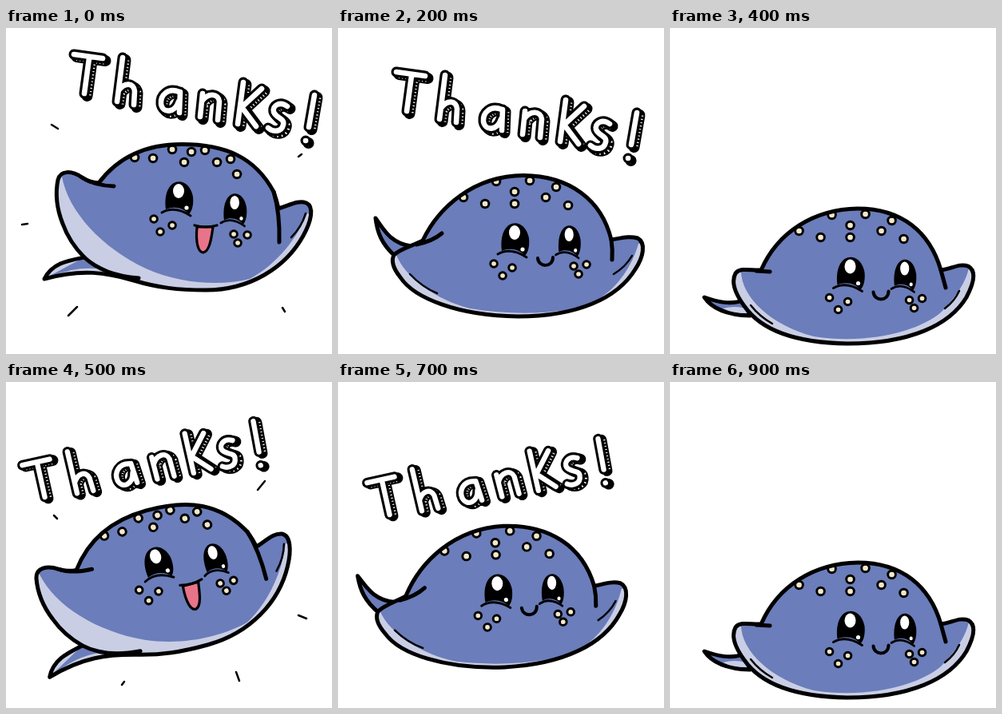
An HTML page without scripts for the animation above (1000 ms loop, 408 by 408 pixels).

```html
<!DOCTYPE html>
<html lang="en">
<head>
<meta charset="utf-8">
<title>Thanks!</title>
<style>
  html, body { margin: 0; width: 100%; height: 100%; overflow: hidden; background: #fff; }
  svg { display: block; width: 100vw; height: 100vh; fill: none; stroke-linecap: round; stroke-linejoin: round; }
  .line { stroke: #000; stroke-width: 5; }
  .thin { stroke-width: 2.5; }
  .blue { fill: #6b7dba; }
  .pale { fill: #c9cee4; }
  .pink { fill: #e8748a; stroke-width: 3.2; }
  .rim { stroke: #000; stroke-width: 12.5; }
  .cream { stroke: #f3e8cb; stroke-width: 6.6; }
  .small .rim { stroke-width: 11.5; }
  .small .cream { stroke-width: 5.6; }
  .shade { stroke: #000; stroke-width: 14; }
  .hatch { stroke: #fff; stroke-width: 10; stroke-dasharray: 1.2 3; stroke-linecap: butt; }
  .edge { stroke: #000; stroke-width: 13; }
  .fill { stroke: #fff; stroke-width: 6.6; }
  .pose { visibility: hidden; animation: show 1s step-end infinite; animation-delay: calc(var(--i) * 100ms - 1000ms); }
  @keyframes show {
    0% { visibility: visible; }
    10%, 100% { visibility: hidden; }
  }
</style>
</head>
<body>
<svg viewBox="0 0 408 408" role="img" aria-label="A happy manta ray saying Thanks!">
  <defs>
    <!-- lettering -->
    <path id="letters" d="M85 33L121 38M104 38L98 82
      M146 37L139 92M141 78C149 67 160 69 161 79L160 96
      M217 80C203 74 193 84 194 95C196 107 211 107 216 92M218 80L217 106
      M246 82L243 111M245 92C253 80 266 82 267 92L265 115
      M297 68L290 120M320 76L295 99L313 123
      M352 98C343 91 333 97 335 105C338 113 349 113 347 121C345 130 335 131 328 125
      M386 84L379 124M375 141h.1"/>
    <g id="thanks">
      <g transform="translate(3.5 3)">
        <use href="#letters" class="shade"/>
        <use href="#letters" class="hatch"/>
      </g>
      <use href="#letters" class="edge"/>
      <use href="#letters" class="fill"/>
    </g>
    <g id="tilted"><use href="#thanks" transform="translate(49 148) rotate(-20.4) scale(.964) translate(-97 -86)"/></g>

    <!-- faces -->
    <g id="eye">
      <path fill="#000" d="M-17 14C-22 -28 12 -30 17 -2C18 8 16 16 12 20C6 13 -6 9 -17 14Z"/>
      <path class="line" style="stroke-width:3" d="M-22 18Q-6 9 14 22"/>
      <ellipse cx="-1" cy="-9" rx="7" ry="9" fill="#fff"/>
      <circle cx="9" cy="12" r="2.6" fill="#fff"/>
    </g>
    <path id="joyDots" d="M161 162h.1M184 163h.1M208 152h.1M223 168h.1M232 155h.1M249 153h.1M264 168h.1M281 164h.1M289 183h.1"/>
    <path id="joyCheeks" d="M185 239h.1M208 247h.1M193 255h.1M285 258h.1M302 259h.1M290 269h.1"/>
    <path id="calmDots" d="M157 212h.1M184 220h.1M198 192h.1M221 205h.1M221 220h.1M240 191h.1M260 212h.1M273 199h.1M288 222h.1"/>
    <path id="calmCheeks" d="M195 295h.1M218 300h.1M206 310h.1M295 298h.1M311 296h.1M301 308h.1"/>
    <g id="joySpots"><use href="#joyDots" class="rim"/><use href="#joyDots" class="cream"/></g>
    <g id="calmSpots"><use href="#calmDots" class="rim"/><use href="#calmDots" class="cream"/></g>
    <g id="joy">
      <use href="#eye" transform="translate(217 213)"/>
      <use href="#eye" transform="translate(287 227) scale(.83 .95)"/>
      <g class="small"><use href="#joyCheeks" class="rim"/><use href="#joyCheeks" class="cream"/></g>
      <path class="line pink" d="M239 249C237 270 241 281 247 281C255 279 257 263 259 249Z"/>
      <path class="line" style="stroke-width:3.2" d="M236 247Q250 251 264 247"/>
    </g>
    <g id="calm">
      <use href="#eye" transform="translate(222 265)"/>
      <use href="#eye" transform="translate(290 267) scale(.8 .95)"/>
      <g class="small"><use href="#calmCheeks" class="rim"/><use href="#calmCheeks" class="cream"/></g>
      <path class="line" style="stroke-width:4" d="M250 288C251 300 269 300 269 287"/>
    </g>

    <!-- bodies -->
    <path id="highShape" d="M116 194C140 162 175 145.500 220 145.500C275 145.500 312 162 335 205Q339 216 341 226C355 222 365 215 376 219C386 224 382 242 372 260C350 300 305 328 250 328C215 328 190 325 160 316C125 306 95 301 48 314C58 294 78 291 98 287C84 273 76 259 71 245C63 225 62 205 65 190C68 178 82 178 95 187Q104 193 116 194Z"/>
    <path id="glideShape" d="M108 214C130 178 170 155 215 155C270 154 310 178 328 215Q333 228 335 241C350 237 360 229 371 233C382 238 380 258 370 275C345 312 290 337 220 337C160 336 110 325 64 303C55 297 47 291 43 282C62 294 80 297 99 296C75 280 62 262 56 240C52 220 58 208 72 210C85 212 95 218 108 214Z"/>
    <path id="dipShape" d="M106 266C126 224 170 185 232 184.500C290 185 330 215 342 265C355 263 364 260 375 263C386 269 382 287 372 302C350 338 300 361 225 361C150 360 95 338 78 312C70 302 66 292 70 284C78 276 95 272 106 266Z"/>
    <path id="lowShape" d="M114 303C135 255 180 227 235 226C290 226 325 255 339 303C352 302 362 294 373 298C384 304 380 320 371 337C350 372 300 395 222 395C160 394 115 380 93 348C82 333 76 318 82 307C88 299 102 304 114 303Z"/>
    <clipPath id="highClip"><use href="#highShape"/></clipPath>
    <clipPath id="glideClip"><use href="#glideShape"/></clipPath>
    <clipPath id="dipClip"><use href="#dipShape"/></clipPath>
    <clipPath id="lowClip"><use href="#lowShape"/></clipPath>

    <g id="high">
      <use href="#highShape" class="blue"/>
      <g clip-path="url(#highClip)">
        <path class="pale" d="M70 186C78 230 120 275 175 301C220 321 270 323 305 314C340 295 365 262 377 232L400 240V400H40V186Z"/>
        <path class="blue" d="M40 318L98 287L128 303Q92 296 60 310Z"/>
        <use href="#joySpots"/>
      </g>
      <use href="#highShape" class="line"/>
      <path class="line" d="M95 187Q110 197 135 198M335 205Q343 232 342 268M98 287C115 303 140 311 166 313"/>
      <path class="line thin" d="M375 232Q370 249 357 262"/>
      <use href="#joy"/>
    </g>

    <g id="glide">
      <use href="#glideShape" class="blue"/>
      <g clip-path="url(#glideClip)">
        <path class="pale" d="M61 218C75 255 110 287 150 304C200 325 265 329 315 317C350 295 368 270 376 243L400 250V400H30V218Z"/>
        <path class="blue" d="M38 276L99 296L132 318Q85 312 52 292Z"/>
        <use href="#joySpots" transform="translate(-4 11) rotate(-2 235 200)"/>
      </g>
      <use href="#glideShape" class="line"/>
      <path class="line" d="M90 216Q105 220 124 216M328 215Q339 245 338 277M99 296C118 313 145 323 175 323"/>
      <path class="line thin" d="M75 232Q82 250 95 262M374 246Q370 262 358 275"/>
      <use href="#joy" transform="translate(-4 11) rotate(-2.5 235 200)"/>
    </g>

    <g id="dip">
      <path class="line blue" d="M72 286C54 270 49 255 47 238C57 252 66 270 92 273Z"/>
      <use href="#dipShape" class="blue"/>
      <g clip-path="url(#dipClip)">
        <path class="pale" d="M73 284C84 312 122 340 165 351C225 361 295 358 325 340C350 325 368 298 376 270L400 270V400H40V284Z"/>
        <use href="#calmSpots"/>
      </g>
      <use href="#dipShape" class="line"/>
      <path class="line" d="M98 271Q118 267 130 257M342 265Q344 277 343 290"/>
      <path class="line thin" d="M90 308Q105 324 124 332M368 285Q360 299 345 308"/>
      <use href="#calm"/>
    </g>

    <g id="low">
      <path class="line blue" d="M100 360C72 359 53 352 43 337C60 343 76 347 94 340Z"/>
      <path class="pale" d="M66 351Q82 347 94 351L96 357Q78 357 66 351Z"/>
      <use href="#lowShape" class="blue"/>
      <g clip-path="url(#lowClip)">
        <path class="pale" d="M89 303C88 335 125 372 180 386C250 397 315 378 340 355C362 332 371 315 374 300H400V400H40V303Z"/>
        <use href="#calmSpots" transform="translate(4.5 42)"/>
      </g>
      <use href="#lowShape" class="line"/>
      <path class="line" d="M108 304L125 305M339 303L345 325"/>
      <path class="line thin" d="M101 347Q112 361 128 370M362 329Q356 342 344 351"/>
      <use href="#calm" transform="translate(4.5 42.5)"/>
    </g>
  </defs>

  <g class="pose" style="--i:0">
    <use href="#thanks"/>
    <use href="#high"/>
    <path class="line thin" d="M57 121L65 126M366 161L370 158M20 246L27 245M78 360L89 349M346 350L349 355"/>
  </g>
  <g class="pose" style="--i:1">
    <use href="#thanks" x="-6" y="13"/>
    <use href="#glide"/>
  </g>
  <g class="pose" style="--i:2">
    <use href="#thanks" x="-12" y="22"/>
    <use href="#dip"/>
  </g>
  <g class="pose" style="--i:3">
    <use href="#thanks" x="-18" y="32"/>
    <use href="#dip" x="4" y="21"/>
  </g>
  <g class="pose" style="--i:4">
    <use href="#low"/>
  </g>
  <g class="pose" style="--i:5">
    <use href="#tilted"/>
    <use href="#high" transform="translate(-75.5 79.5) rotate(-15.5)"/>
    <path class="line thin" d="M60 167L64 171M315 135L324 124M366 292L376 296M288 363L292 374M145 379L148 375"/>
  </g>
  <g class="pose" style="--i:6">
    <use href="#tilted" x="8" y="11"/>
    <use href="#glide" transform="translate(-21 2) rotate(-8 247 230)"/>
  </g>
  <g class="pose" style="--i:7">
    <use href="#tilted" x="16" y="22"/>
    <use href="#dip" transform="translate(-21 -3.5) rotate(-2.8 215 270)"/>
  </g>
  <g class="pose" style="--i:8">
    <use href="#tilted" x="24" y="32"/>
    <use href="#dip" x="4" y="21"/>
  </g>
  <g class="pose" style="--i:9">
    <use href="#low"/>
  </g>
</svg>
</body>
</html>
```
